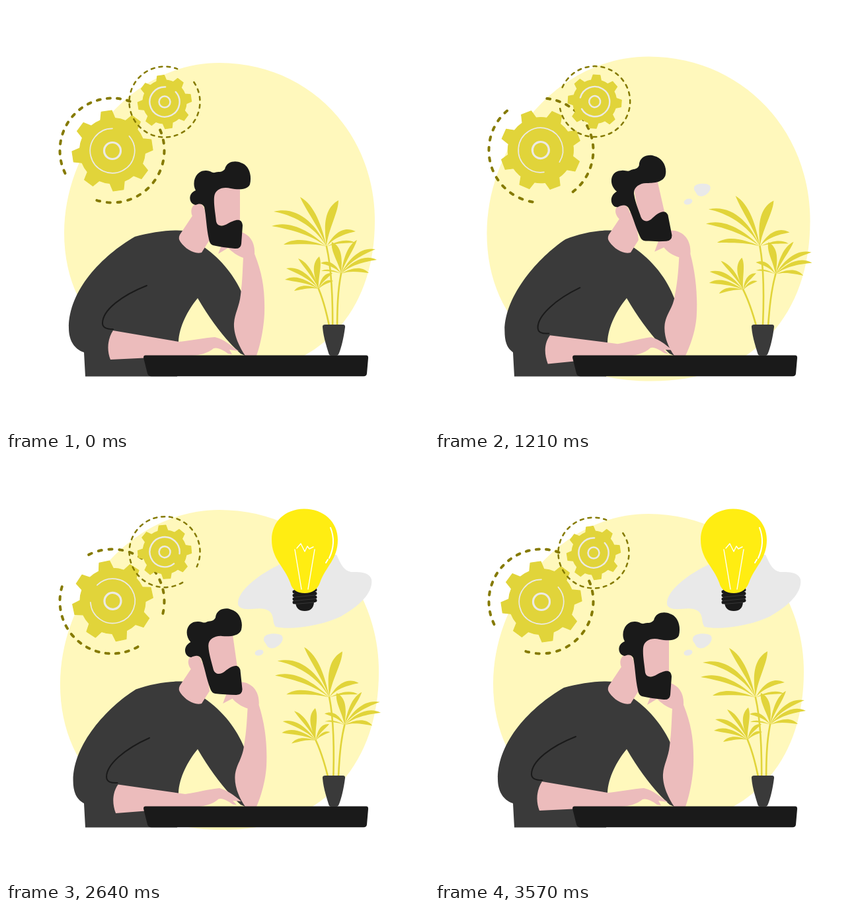
Recreate the animation shown at these times as an HTML page. Size 640x640 px, loop 3640 ms.

```html
<!DOCTYPE html>
<html lang="en">
<head>
<meta charset="utf-8">
<title>Thinking it over</title>
<style>
  html, body { margin: 0; width: 100%; height: 100%; overflow: hidden; background: #fff; }
  svg { display: block; width: 100vw; height: 100vh; }
  .line { fill: none; stroke-linecap: round; stroke-linejoin: round; }
  .ring { stroke: #857a00; }
  .gold { fill: #e1d43a; }
  .stem { stroke: #e1d43a; stroke-width: 2.6; }
  .pale { stroke: #eceae4; }
  .skin { fill: #ecbcbc; }
  .ink { fill: #1a1a1a; }
  .shirt { fill: #3a3a3a; }
  .cloud { fill: #e9e9e9; }
</style>
</head>
<body>
<svg viewBox="0 0 640 640">
  <path id="blob" fill="#fff8bc" d="M323 86C456 86 558 190 558 325C558 467 470 558 328 558C185 558 88 475 88 343C88 215 190 86 323 86Z"/>

  <g id="bigRing"></g>
  <g id="bigGear"></g>
  <g id="smallGear"></g>

  <ellipse id="puff1" class="cloud" cx="383" cy="296" rx="6.6" ry="4.4"/>
  <path id="puff2" class="cloud" d="M391 272C395 266 412 266 417 270C422 276 415 285 408 288C402 291 396 289 394 284C392 280 388 278 391 272Z"/>
  <path id="cloud" class="cloud" d="M351 222C350 203 382 177 418 161C440 149 470 145 500 148C506 160 510 172 522 174C533 174 549 173 553 185C556 205 535 226 505 242C475 256 430 262 408 257C402 250 407 240 398 233C388 226 375 231 362 230C355 229 351 226 351 222Z"/>
  <g id="bulb">
    <path class="ink" d="M436 200H468V220H466Q465 233 452 233Q439 233 438 220H436Z"/>
    <path class="line" stroke="#1a1a1a" stroke-width="5" d="M436 204L468 201M436 209.500L468 206.500M436 215L468 212M436 220L468 217"/>
    <path class="line" stroke="#4a4a4a" stroke-width=".6" d="M437 212L468 209M437 217.500L468 214.500M438 222.500L466 220"/>
    <path fill="#ffed12" d="M450.500 78.500C480 78 502 98 502 125C502 155 484 165 475 190Q469 206 452 206Q434 206 430 190C421 165 402 155 402 125C402 98 422 79 450.500 78.500Z"/>
    <path class="line" stroke="#fff" stroke-width="1.400" d="M437 140L447 200M467 140L457 200M440 138L446 131L452 143L456 135L459 139L465 136"/>
    <path class="line" stroke="#fff" stroke-width="2" d="M491 107C497 122 496 138 489 153M487 155L484 160"/>
  </g>

  <g id="tall"></g>
  <g id="right"></g>
  <g id="left"></g>

  <path id="shirt" class="shirt"/>
  <path id="crease" class="line" stroke="#1a1a1a" stroke-width="2"/>
  <path class="skin" d="M283 316L263 346Q260 352 264 357C272 368 285 376 296 373L308 354L302 310Z"/>
  <path id="foreLeft" class="skin"/>
  <path id="foreRight" class="skin"/>
  <path id="face" class="skin"/>
  <path id="ear" class="skin"/>
  <path id="hair" class="ink"/>
  <path class="ink" d="M211 528.500H545Q548.500 528.500 548 533L546 556Q545.500 560.300 541 560.300H220Q215.500 560.300 214 556L208.500 534Q207 528.500 211 528.500Z"/>
  <path class="shirt" d="M483 482H510Q513.500 482 513 486C511 502 507 518 504 525Q502.500 529 500 529H492Q489 529 488 525C484 512 480 499 479 486Q478.500 482 483 482Z"/>
</svg>
<script>
const LOOP = 3640, FPS = 14, LAST = 50;
const $ = id => document.getElementById(id);
const move = (id, transform) => $(id).setAttribute('transform', transform);

// Polar point, degrees clockwise from the top.
const polar = (r, deg) => {
  const a = deg * Math.PI / 180;
  return (r * Math.sin(a)).toFixed(2) + ' ' + (-r * Math.cos(a)).toFixed(2);
};
const arc = (r, from, to) =>
  `M${polar(r, from)}A${r} ${r} 0 ${+(to - from > 180)} 1 ${polar(r, to)}`;

function dashes(r, from, to, count, dash, width) {
  const len = r * (to - from) * Math.PI / 180;
  const gap = (len - dash) / count - dash;
  return `<path class="line ring" stroke-width="${width}" stroke-dasharray="${dash} ${gap}" d="${arc(r, from, to)}"/>`;
}

function gear(outer, base, offset) {
  let d = '';
  for (let i = 0; i < 8; i++) {
    const a = offset + i * 45;
    d += `${i ? 'L' : 'M'}${polar(base, a - 13)}L${polar(outer, a - 7.5)}L${polar(outer, a + 7.5)}` +
         `L${polar(base, a + 13)}A${base} ${base} 0 0 1 ${polar(base, a + 32)}`;
  }
  return `<path class="gold" stroke="#e1d43a" stroke-width="1.200" stroke-linejoin="round" d="${d}Z"/>`;
}

const track = (r, from, to, width) =>
  `<path class="line pale" stroke-width="${width}" d="${arc(r, from, to)}"/>`;
const hub = (r, width) =>
  `<circle class="line pale" r="${r}" stroke-width="${width}"/>`;

$('bigRing').innerHTML = dashes(79, 244, 380, 12, 5, 4) + dashes(79, 67, 197, 11, 5, 4);
$('bigGear').innerHTML = gear(61, 49.5, -8.5) + track(33.7, 49, 360, 1.7) + hub(12.5, 3.2);
$('smallGear').innerHTML = dashes(53.5, 56, 381, 25, 5, 2.5) +
  gear(40.6, 33, -8.5) + track(22.6, 48, 363, 2.4) + hub(8.5, 2.5);

// Leaves: tip x, tip y, bend, width; all grow from one crown, widest near the tip.
function plant(id, [x, y], stem, leaves) {
  const blades = leaves.map(([tx, ty, bend, w]) => {
    const dx = tx - x, dy = ty - y, len = Math.hypot(dx, dy);
    const at = (u, off) => `${x + dx * u - dy / len * off} ${y + dy * u + dx / len * off}`;
    const near = s => at(.35, bend * .67 + s * w * .2);
    const far = s => at(.75, bend * .67 + s * w * .8);
    return `M${x} ${y}C${near(1)} ${far(1)} ${tx} ${ty}C${far(-1)} ${near(-1)} ${x} ${y}`;
  }).join('');
  $(id).innerHTML = `<path class="line stem" d="M${x} ${y}${stem}"/><path class="gold" d="${blades}"/>`;
}

plant('tall', [485, 364], 'C492 395 495 440 494 500', [
  [405, 311, 28, 10], [402, 333, 17, 9], [445, 289, 9, 10], [503, 294, -11, 15],
  [420, 361, 10, 8], [529, 341, -15, 9], [528, 358, -7, 5]]);
plant('right', [507, 405], 'C502 430 501 455 501 500', [
  [531, 354, -6, 8], [559, 368, -15, 8], [561, 384, -14, 8], [549, 404, -10, 7],
  [493, 357, 6, 13], [476, 389, 10, 7], [477, 401, 5, 3]]);
plant('left', [473, 428], 'C480 445 486 465 492 500', [
  [442, 382, 7, 7], [474, 379, -6, 12], [424, 397, 12, 8], [422, 414, 10, 8],
  [436, 431, 8, 6], [494, 404, -8, 7], [495, 416, -6, 5]]);

// Body outlines, leaning forward and leaning back.
const poses = {
  shirt: [
    'M195 349C220 342 250 338 270 340L300 365C327 384 347 411 357 434L362 529L355 526C335 508 312 480 290 442C275 460 262 485 261 508L259 560.5H120L118 524C105 520 95 508 95 487C95 430 145 378 195 349Z',
    'M198 354C220 344 250 338 270 340L300 365C330 385 352 413 364 446L362 529L355 526C335 508 312 480 290 442C275 460 262 485 261 508L259 560.5H120L118 524C112 518 108 512 108 492C108 440 160 380 198 354Z'],
  crease: [
    'M213 423C175 438 146 460 146 480C146 487 153 489 162 489',
    'M221 427C185 445 158 470 158 488C158 496 165 498 175 497'],
  foreLeft: [
    'M162 491L262 508C280 506 300 502 316 501C330 504 340 514 352 522L338 520L342 527L336 526C328 520 320 516 314 518C306 525 292 529 280 529L158 535C152 520 154 503 162 491Z',
    'M177 500L280 512C298 509 314 503 330 501C342 505 352 512 360 520L348 520L356 526L350 525C341 519 334 515 329 517C320 526 305 529 292 530L174 543C168 527 168 512 177 500Z'],
  foreRight: [
    'M356 342C369 346 377 358 376 375C388 405 392 430 391 465C390 490 384 515 379 529L362 529C352 515 344 495 345 480C346 465 353 455 355 437C358 415 358 395 359 381C350 378 342 372 336 366L321 375L326 362Z',
    'M358 339C376 338 391 352 389 375C396 405 399 440 397 470C395 495 386 515 379 529L362 529C352 515 347 500 348 485C350 465 362 460 365 437C370 415 371 395 372 380C362 377 354 372 349 365L335 371L342 352Z'],
  face: [
    'M313 274L354 274L354 332L313 332Z',
    'M296 268L332 262L348 318L310 328Z'],
  ear: [
    'M287 325C277 315 279 301 289 299C297 298 301 303 302 318L306 345Z',
    'M281 325C269 317 268 304 278 302C286 299 291 304 294 316L302 343Z'],
  hair: [
    'M287 301C277 300 274 284 287 279C280 266 288 248 303 249C309 249 312 253 316 252C320 250 326 253 331 247C334 233 350 234 355 237C369 241 372 258 369 270C365 279 350 278 340 276C328 273 316 277 315 289C314 300 317 315 318 326C320 334 328 334 336 329C345 324 357 319 358 332L356 360Q355 368 346 367C335 366 322 364 313 362Q308 360 307 353C303 335 303 318 300 304C297 298 291 299 287 301Z',
    'M274 305C264 307 258 290 272 281C258 272 258 250 277 249C283 248 286 251 290 248C294 245 300 247 303 240C303 224 318 222 325 224C339 227 347 241 343 254C338 265 324 265 314 266C304 267 294 275 298 286C300 296 306 308 310 318C314 326 322 325 327 319C333 312 345 302 351 312L359 343Q360 351 351 353C341 354 330 354 320 354Q314 354 311 348C302 331 298 317 291 306C287 300 280 302 274 305Z']
};
const mix = (a, b, p) => a + (b - a) * p;
const blend = ([from, to], p) => {
  const ends = to.match(/[\d.]+/g);
  let i = 0;
  return from.replace(/[\d.]+/g, n => mix(+n, +ends[i++], p).toFixed(2));
};

const zoom = (x, y, s) => `translate(${x} ${y}) scale(${s}) translate(${-x} ${-y})`;
const pop = (k, start, span) =>
  Math.sin(Math.min(1, Math.max(0, (k - start) / span)) * Math.PI / 2);

function sway(k) {
  const top = 24.2;
  const u = k < top ? k / top : (LAST - k) / (LAST - top);
  return (1 - Math.cos(Math.PI * u)) / 2;
}

function draw(k) {
  const p = sway(k), turn = k * 360 / LAST;

  move('blob', zoom(323, 322.5, 1 + .051 * p));
  move('bigRing', `translate(160.5 218.5) rotate(${turn})`);
  move('bigGear', `translate(160.7 218.2) rotate(${turn}) translate(.3 .8)`);
  move('smallGear', `translate(240.7 144.4) rotate(${-turn}) translate(-.7 .7)`);

  // All stems bend from the foot of the pot.
  move('tall', `rotate(${2.9 * p} 495 528)`);
  move('right', `rotate(${4.8 * p} 495 528)`);
  move('left', `rotate(${-4.7 * p} 495 528)`);

  for (const id in poses) $(id).setAttribute('d', blend(poses[id], p));

  move('puff1', zoom(383, 296, pop(k, 11, 6.5)) + ' rotate(-15 383 296)');
  move('puff2', zoom(404, 278.5, pop(k, 13, 6)));
  move('cloud', zoom(452, 203, pop(k, 17, 6)));
  move('bulb', zoom(451, 233, pop(k, 19.5, 6)));
}

const begin = performance.now();
function tick() {
  const t = (performance.now() - begin) % LOOP;
  draw(Math.min(LAST, Math.floor((t + 5) * FPS / 1000)));
  requestAnimationFrame(tick);
}
tick();
</script>
</body>
</html>
```
